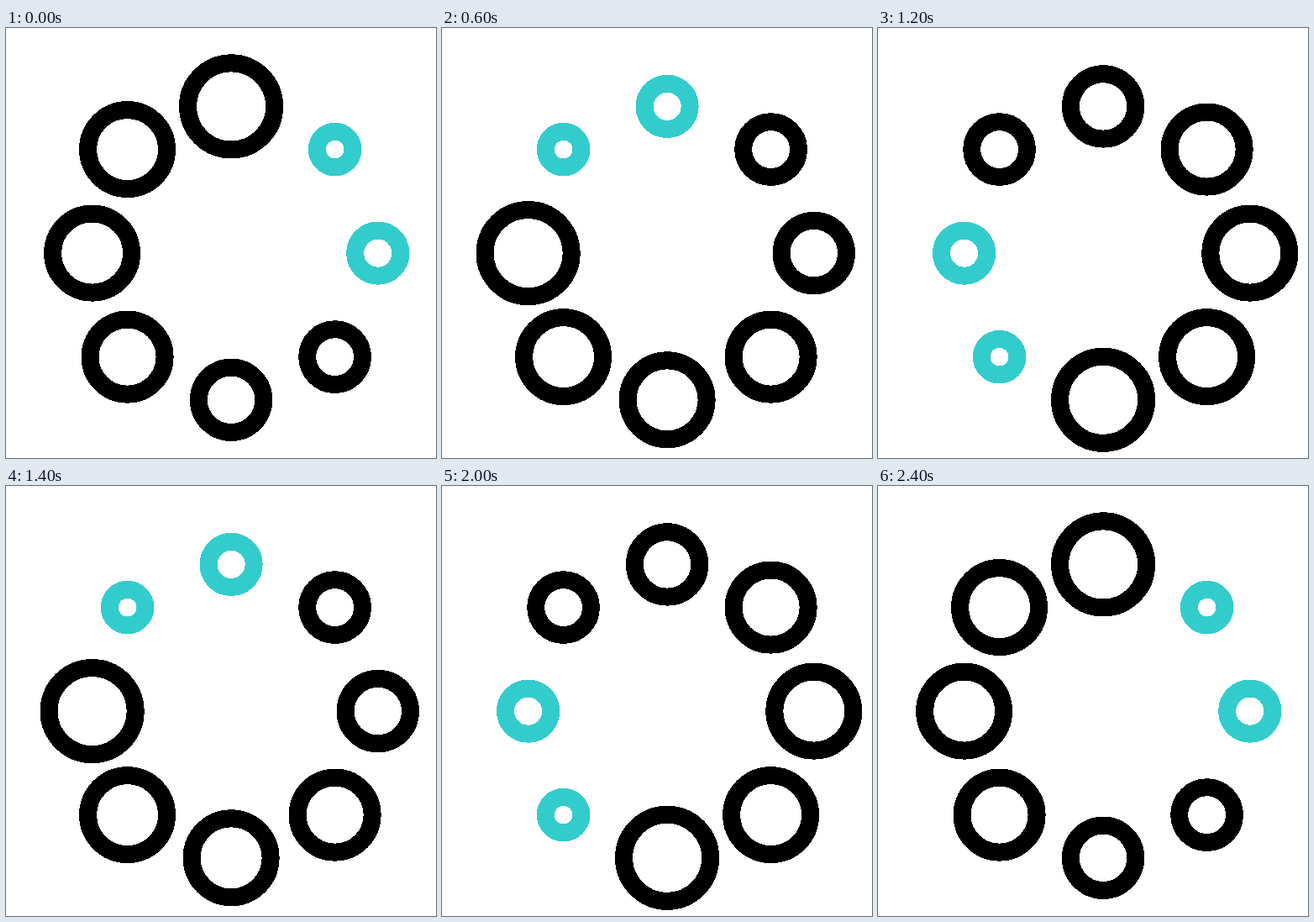
An HTML page for the animation above (2.42 s loop, 512x512 px).

```html
<!DOCTYPE html>
<html lang="en">
<head>
<meta charset="utf-8">
<title>Ring spinner</title>
<style>
  html, body { margin: 0; width: 100%; height: 100%; overflow: hidden; background: #fff; }
  svg { display: block; }
  circle { fill: none; stroke-width: 21px; shape-rendering: crispEdges; }
</style>
</head>
<body>
<svg id="stage" width="512" height="512" viewBox="0 0 512 512"></svg>
<script>
const LOOP = 2420, STEP = 100, COUNT = 8;
const CENTRE = 268.1, ORBIT = 174.7, LEFT = 102.6;
const stage = document.getElementById('stage');

// Rings sit clockwise from the top; the leftmost is pulled inwards
const rings = Array.from({ length: COUNT }, (_, i) => {
  const angle = i * 2 * Math.PI / COUNT;
  const ring = document.createElementNS('http://www.w3.org/2000/svg', 'circle');
  ring.setAttribute('cx', Math.max(LEFT, CENTRE + ORBIT * Math.sin(angle)));
  ring.setAttribute('cy', CENTRE - ORBIT * Math.cos(angle));
  return stage.appendChild(ring);
});

// The head is largest; the rest grow clockwise up to a limit
const radius = k => k === 0 ? 51.6 : Math.min(15.5 + 5.8 * k, 47);
const colour = k => k === 1 || k === 2 ? '#33cccc' : '#000';

function draw(time) {
  const head = Math.floor((time % LOOP) / STEP) % COUNT;
  rings.forEach((ring, i) => {
    const k = (i - head + COUNT) % COUNT;
    ring.setAttribute('r', radius(k));
    ring.setAttribute('stroke', colour(k));
  });
}

const start = performance.now();
function tick() {
  draw(performance.now() - start);
  requestAnimationFrame(tick);
}
tick();
</script>
</body>
</html>
```
